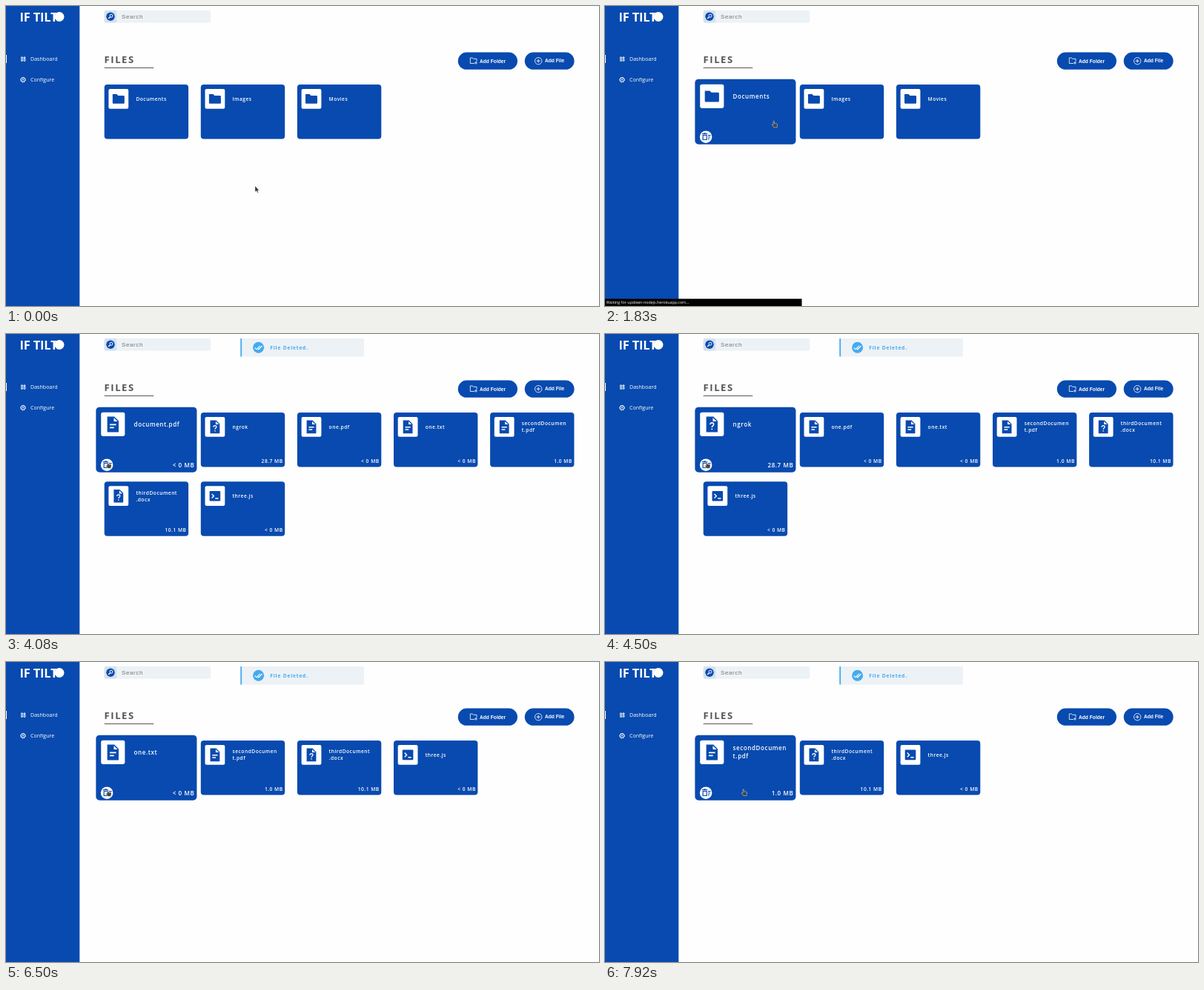
Write an HTML page that moves like this. It is 800x405 px and loops after 8 s.

```html
<!DOCTYPE html>
<html lang="en">
<head>
<meta charset="utf-8">
<title>File manager</title>
<style>
  html, body { margin: 0; width: 100%; height: 100%; overflow: hidden; background: #fefefe; }
  svg { display: block; font-family: "Open Sans", "Noto Sans", sans-serif; --blue: #084aaf; }
  text { fill: #fff; white-space: pre; }
  .blue { fill: var(--blue); }
  .white { fill: #fff; }
  .line { fill: none; stroke: #fff; }
  .ink { stroke: var(--blue); }
  .logo { font: 700 16.5px "Open Sans", sans-serif; font-stretch: 75%; letter-spacing: -.2px; }
  .nav { font-size: 7.1px; }
  .search { font: 8px "Liberation Sans", Arial, sans-serif; letter-spacing: .6px; fill: #757575; }
  .title { font-size: 13px; font-weight: 700; letter-spacing: 1.6px; fill: #555; }
  .button { font: 700 6.67px "Liberation Sans", Arial, sans-serif; }
  .label { font-size: 6.67px; font-weight: 600; letter-spacing: .5px; }
  .size { text-anchor: end; }
  .notice { font-size: 6.67px; font-weight: 700; letter-spacing: .8px; fill: #45aaf0; }
  .status { font-size: 5.3px; }
</style>
</head>
<body>
<svg width="800" height="405" viewBox="0 0 800 405">
  <rect class="blue" width="99.3" height="405"/>
  <text class="logo" x="18.5" y="20.5">IF TILT</text>
  <circle class="white" cx="72" cy="14.5" r="6.5"/>
  <rect class="white" y="66" width="1" height="11"/>
  <path class="line" stroke-width=".9" d="M20.5 69h2v2.600h-2zM24 69h2v1.400h-2zM20.500 73h2v1.200h-2zM24 71.800h2v2.400h-2z"/>
  <circle class="line" cx="23" cy="99.600" r="2.800"/>
  <circle class="line" cx="23" cy="99.600" r="3.300" stroke-dasharray="1.300 1.292"/>
  <circle class="white" cx="23" cy="99.600" r="1"/>
  <text class="nav" x="33" y="74.200">Dashboard</text>
  <text class="nav" x="33" y="102.200">Configure</text>

  <rect x="132.700" y="6" width="143.500" height="16.500" rx="2" fill="#ecf2f6"/>
  <rect x="132.700" y="6" width="16.500" height="16.500" rx="2" fill="#d3e1f0"/>
  <circle class="blue" cx="141" cy="14.200" r="5.700"/>
  <circle class="line" cx="142" cy="13.200" r="2"/>
  <path class="line" stroke-width="1.300" d="M140.500 14.700l-2.300 2.300"/>
  <text class="search" x="156" y="17">Search</text>

  <text class="title" x="132.500" y="77">FILES</text>
  <rect x="132.700" y="83" width="66.500" height="1" fill="#555"/>

  <rect class="blue" x="609.800" y="62.500" width="80.200" height="23.300" rx="11.650"/>
  <path class="line" stroke-width=".8" d="M632 77.500h-5.700v-7.500h3.200l1 1.300h4.500v3.500M634 74.800v4M632 76.800h4"/>
  <text class="button" x="639" y="76.500">Add Folder</text>
  <rect class="blue" x="699.800" y="62.500" width="66.800" height="23.300" rx="11.650"/>
  <circle class="line" cx="718.200" cy="74.200" r="4.700" stroke-width=".8"/>
  <path class="line" stroke-width=".9" d="M715.700 74.200h5M718.200 71.700v5"/>
  <text class="button" x="727" y="76.200">Add File</text>

  <g id="cards"></g>

  <g id="notice">
    <rect x="316.500" y="6" width="166.500" height="24.500" rx="1.500" fill="#ecf2f6"/>
    <rect x="316.300" y="6" width="1.800" height="24.500" fill="#45aaf0"/>
    <circle cx="340.600" cy="18.200" r="7.500" fill="#45aaf0"/>
    <path class="line" stroke-width="1.100" d="M335.800 18.500l2.300 2.300 4.600-4.800M339.800 19.900l1 1 4.700-4.900"/>
    <text class="notice" x="356.300" y="20.700">File Deleted.</text>
  </g>

  <g id="status">
    <rect y="395.300" width="265.500" height="10"/>
    <text class="status" x="1.800" y="402.200">Waiting for updown-nodejs.herokuapp.com...</text>
  </g>

  <g id="cursor">
    <path id="arrow" fill="#333" stroke="#ddd" stroke-width=".5" d="M0 0v8l1.800-1.600 1.300 2.700 1.300-.6-1.200-2.600h2.300z"/>
    <path id="hand" fill="#444" stroke="#ccc" stroke-width=".6" d="M0 .6Q.7-.4 1.400.600V3.300L5 4Q5.700 4.300 5.600 5.200L5 9H.800L-1.700 5.700Q-1.600 4.700-.700 5L0 5.600Z"/>
  </g>
</svg>
<script>
const LOOP = 8000, GROW = 90;
const CARD = { x: 132.7, y: 106, w: 113.4, h: 73.4, stepX: 130.1, stepY: 93.3, columns: 5 };

const folders = ["Documents", "Images", "Movies"].map(name => ({ name, icon: "folder" }));
const files = [
  ["document.pdf", "page", "< 0"], ["ngrok", "unknown", "28.7"], ["one.pdf", "page", "< 0"],
  ["one.txt", "page", "< 0"], ["secondDocument.pdf", "page", "1.0"],
  ["thirdDocument.docx", "unknown", "10.1"], ["three.js", "code", "< 0"],
].map(([name, icon, size]) => ({ name, icon, size: size.replace("<", "&lt;") + " MB" }));

// Each view: start time, items, and when the first card begins to grow.
const views = [
  [0, folders, 1000],
  [2000, files, 2060],
  [4330, files.slice(1), 4390],
  [5420, files.slice(2), 5405],
  [6500, files.slice(3), 0],
  [7670, files.slice(4), 7730],
];

// Pointer tip: time, x, y.
const path = [
  [430, 336, 243], [700, 455, 213], [930, 275, 194], [1120, 227, 155],
  [2690, 227, 155], [2750, 209.5, 155.5], [3250, 136.5, 171.5],
  [3419, 136.5, 171.5], [3420, 136.5, 172.3], [7720, 136.5, 172.3], [7910, 186, 171.5],
];

const page = '<path class="blue" d="M-6.4-8.800H1.600L6.400-4V8.800H-6.400Z"/><path class="white" d="M1-7.500V-3.300H5.300Z"/>';
const icons = {
  folder: '<path class="blue" d="M-8-6.300h5.600l1.800 1.900h7.500q1.100 0 1.100 1.100v8.600q0 1.100-1.100 1.100h-13.800q-1.100 0-1.100-1.100z"/>',
  page: page + '<path class="line" stroke-width="1.500" d="M-3.600.300h7.200M-3.600 3.700h4.800"/>',
  unknown: page + '<path class="line" stroke-width="1.300" d="M-2 .300q0-2 2-2t2 1.800c0 1.500-2 1.500-2 3.200M0 4.600v1.500"/>',
  code: '<rect class="blue" x="-7.300" y="-6.800" width="14.600" height="13.600" rx="1"/>' +
        '<path class="line" stroke-width="1.400" d="M-4.300-2.800l2.800 2.800-2.800 2.800M.300 3.300h4.300"/>',
};
const trash = '<circle class="white" cx="12.300" cy="65" r="6.900"/>' +
  '<path class="line ink" stroke-width="1" d="M9 63.200h4.200v5h-4.200zM8 61.700h6M10 61h2.200M14.700 63.300h3M14.700 65.300h2.500M14.700 67.300h1.500"/>';

const $ = id => document.getElementById(id);
const smooth = p => (p = Math.min(1, Math.max(0, p)), p * p * (3 - 2 * p));
const show = (id, on) => $(id).setAttribute("opacity", +on);

function cardMarkup({ name, icon, size = "" }, index, growth) {
  const x = CARD.x + index % CARD.columns * CARD.stepX;
  const y = CARD.y + Math.floor(index / CARD.columns) * CARD.stepY;
  const cx = CARD.w / 2, cy = CARD.h / 2;
  const lines = name.match(/.{1,13}/g);
  const labels = lines.map((line, i) =>
    `<text class="label" x="42.700" y="${(lines.length > 1 ? 17.3 : 21.8) + 9.1 * i}">${line}</text>`).join("");
  return `<g transform="translate(${x + cx} ${y + cy}) scale(${1 + .2 * growth}) translate(${-cx} ${-cy})">
    <rect class="blue" width="${CARD.w}" height="${CARD.h}" rx="4"/>
    <rect class="white" x="5.700" y="6" width="26.800" height="26.800" rx="2"/>
    <g transform="translate(19.100 19.400)">${icons[icon]}</g>
    ${labels}<text class="label size" x="110.800" y="67.600">${size}</text>
    ${growth > 0 ? trash : ""}</g>`;
}

function pointerAt(t) {
  const next = path.findIndex(key => key[0] > t);
  if (next === 0) return path[0].slice(1);
  if (next < 0) return path.at(-1).slice(1);
  const [t0, x0, y0] = path[next - 1], [t1, x1, y1] = path[next];
  const p = smooth((t - t0) / (t1 - t0));
  return [x0 + (x1 - x0) * p, y0 + (y1 - y0) * p];
}

function render(t) {
  const [, items, hover] = views.findLast(view => view[0] <= t);
  const growth = smooth((t - hover) / GROW);
  $("cards").innerHTML = items.map((item, i) => cardMarkup(item, i, i ? 0 : growth)).join("");
  show("notice", t >= 4080 && t < 7080 || t >= 7500);
  show("status", t >= 1750 && t < 2000 ? (t < 1830 ? .6 : 1) : 0);
  $("cursor").setAttribute("transform", `translate(${pointerAt(t)})`);
  show("arrow", t < 1000);
  show("hand", t >= 1000);
}

const start = performance.now();
(function tick() {
  render((performance.now() - start) % LOOP);
  requestAnimationFrame(tick);
})();
</script>
</body>
</html>
```
